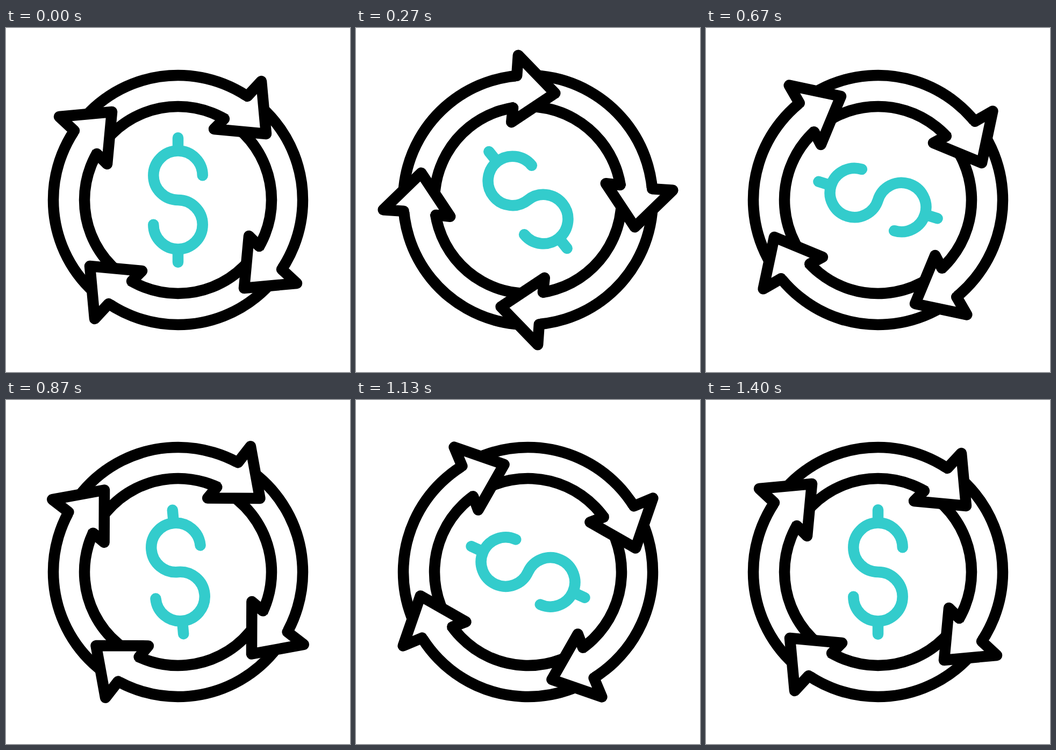
An HTML page for the animation above (2000 ms loop, 640x640 px).

```html
<!DOCTYPE html>
<html lang="en">
<head>
<meta charset="utf-8">
<title>Money cycle</title>
<style>
  html, body { margin: 0; height: 100%; overflow: hidden; background: #fff; }
  svg { display: block; width: 100%; height: 100%; }
</style>
</head>
<body>
<svg viewBox="-320 -320 640 640">
  <g id="icon" fill="none" stroke="#000" stroke-width="20.5" stroke-linecap="round" stroke-linejoin="round">
    <circle r="232"/>
    <circle r="174"/>
    <path id="head" fill="#fff" d="M129-193 155-221 164-123 67-132 86-151"/>
    <use href="#head" transform="rotate(90)"/>
    <use href="#head" transform="rotate(180)"/>
    <use href="#head" transform="rotate(270)"/>
    <path stroke="#3cc" d="M0-115.7V-91.4M45.7-45.7A45.7 45.7 0 1 0 0 0A45.7 45.7 0 1 1-45.7 45.7M0 91.4V115.7"/>
  </g>
</svg>
<script>
const LOOP = 2000, FPS = 30;
const TURN = 17, END = 42;         // steps where the wind-up and the spin end
const WIND_UP = -84, SPIN = 180;   // degrees; the icon looks the same after a half turn
const icon = document.getElementById('icon');

// Ease with control points (x1, 0) and (x2, 1), solved by bisection
function ease(x, x1, x2) {
  let low = 0, high = 1;
  for (let i = 0; i < 30; i++) {
    const t = (low + high) / 2, r = 1 - t;
    if (3 * x1 * t * r * r + 3 * x2 * t * t * r + t * t * t < x) low = t;
    else high = t;
  }
  return low * low * (3 - 2 * low);
}

function angleAt(step) {
  if (step >= END) return SPIN;
  if (step <= TURN) return WIND_UP * ease(step / TURN, 0.318, 0.67);
  return WIND_UP + (SPIN - WIND_UP) * ease((step - TURN) / (END - TURN), 0.316, 0.687);
}

function draw() {
  const time = performance.now() % LOOP;
  const step = Math.floor(time * FPS / 1000 + 0.11);
  icon.setAttribute('transform', `rotate(${angleAt(step).toFixed(3)})`);
  requestAnimationFrame(draw);
}
draw();
</script>
</body>
</html>
```
